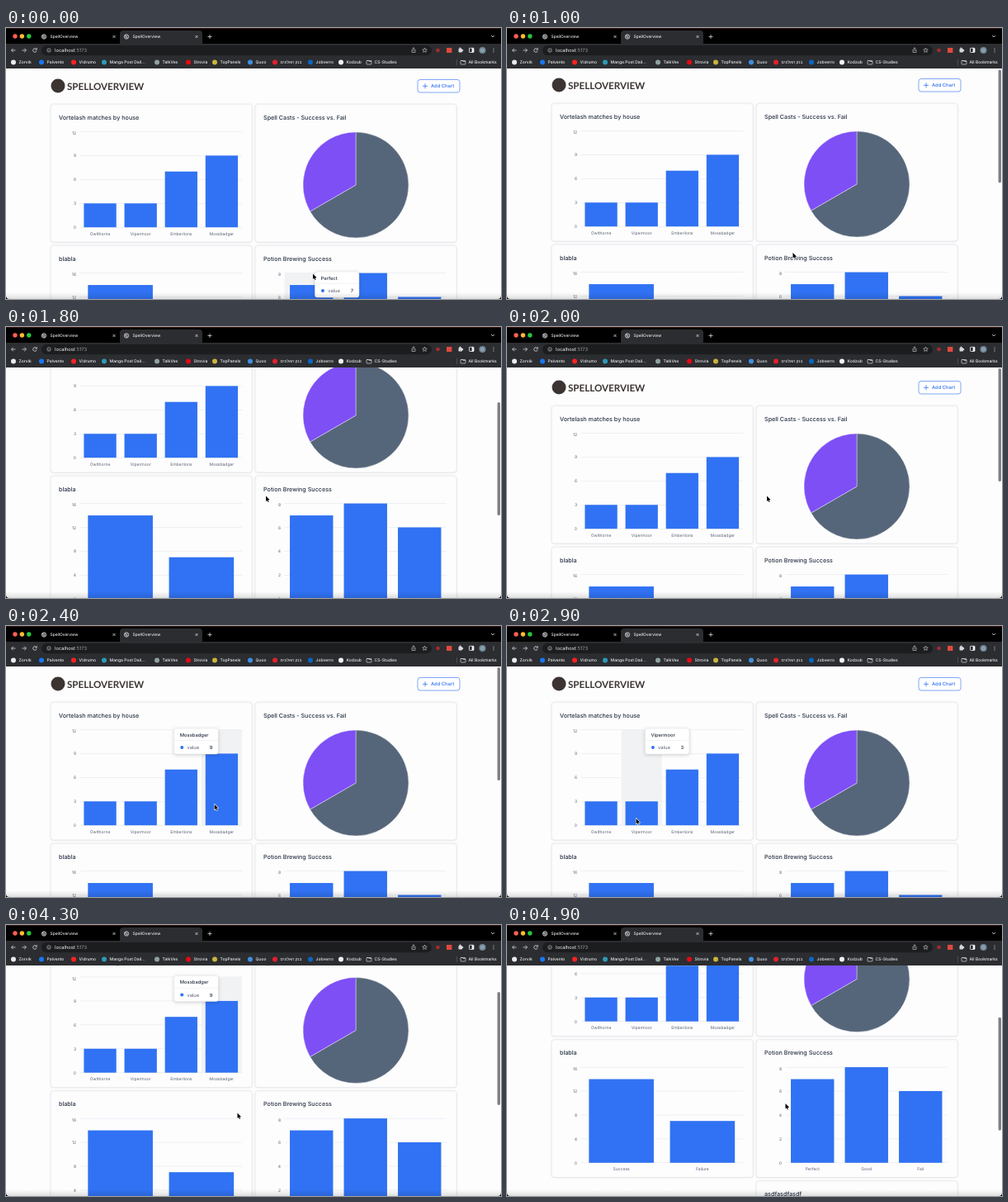
Write an HTML page with a canvas that moves like this. It is 600 px wide and 328 px high and loops after 5000 ms.

```html
<!DOCTYPE html>
<html lang="en">
<head>
<meta charset="utf-8">
<title>SpellOverview</title>
<style>
html, body { margin: 0; width: 100%; height: 100%; overflow: hidden; background: #000; }
canvas { display: block; width: 600px; height: 328px; }
</style>
</head>
<body>
<canvas id="stage"></canvas>
<script>
const W = 600, H = 328, LOOP = 5000, STEP = 100, TOP = 49;
const BLUE = '#3072f3', INK = '#273142', MUTED = '#596273', LINE = '#e5e7eb', PAGE = '#fdfdfe';
const BAR = '#2c2d30', ICON = '#d5d7da', LABEL = '#eceef0';
const FONT = 'Inter, "Liberation Sans", sans-serif';

const canvas = document.getElementById('stage');
const c = canvas.getContext('2d');
const dpr = window.devicePixelRatio || 1;
canvas.width = W * dpr;
canvas.height = H * dpr;
c.textRendering = 'geometricPrecision';

// Charts: plot left, plot top, axis maximum, labels, values
const PLOT_W = 196.5, PLOT_H = 115.7;
const charts = [
  { x: 89.5, y: 125.5, max: 12, names: ['Owlthorne', 'Vipermoor', 'Emberlions', 'Mossbadger'], vals: [3, 3, 7, 9] },
  { x: 89.5, y: 296.6, max: 16, names: ['Success', 'Failure'], vals: [14, 7] },
  { x: 337.5, y: 296.6, max: 8, names: ['Perfect', 'Good', 'Fail'], vals: [7, 8, 6] }
];

// Motion tracks: time, then values
const pointer = [
  [0, 372, 297.5], [500, 346.5, 272], [1100, 346.5, 272], [1600, 315, 204.5], [2100, 315, 204.5],
  [2800, 156.5, 233], [3000, 156.5, 233], [3700, 280.5, 227.5], [4300, 280.5, 227.5], [4900, 337.5, 216]
];
const scroll = [
  [0, 0], [800, 0], [1000, 1], [1400, 124], [1600, 124], [1800, 83], [2000, -3], [2300, 0],
  [3800, 0], [4300, 62.5], [4900, 124.5]
];
// Hover spans: start, end, chart, column
const hovers = [
  [0, 100, 2, 0], [2300, 2500, 0, 3], [2500, 2600, 0, 2], [2600, 3300, 0, 1],
  [3300, 3500, 0, 2], [3500, 4400, 0, 3]
];

function track(keys, t) {
  const i = keys.findIndex(k => k[0] > t);
  if (i < 0) return keys[keys.length - 1].slice(1);
  const a = keys[i - 1], b = keys[i];
  const u = (t - a[0]) / (b[0] - a[0]), e = u * u * (3 - 2 * u);
  return a.slice(1).map((v, n) => v + (b[n + 1] - v) * e);
}

function text(s, x, y, size, color, weight = 400, align = 'left', font = FONT) {
  c.font = `${weight} ${size}px ${font}`;
  c.fillStyle = color;
  c.textAlign = align;
  c.textBaseline = 'alphabetic';
  c.fillText(s, x, y + size * 0.36);
}
function rect(x, y, w, h, color) {
  c.fillStyle = color;
  c.fillRect(x, y, w, h);
}
function round(x, y, w, h, r, fill, stroke, lw = 0.6) {
  c.beginPath();
  c.roundRect(x, y, w, h, r);
  if (fill) { c.fillStyle = fill; c.fill(); }
  if (stroke) { c.strokeStyle = stroke; c.lineWidth = lw; c.stroke(); }
}
function dot(x, y, r, fill, stroke, lw = 0.7) {
  c.beginPath();
  c.arc(x, y, r, 0, 7);
  if (fill) { c.fillStyle = fill; c.fill(); }
  if (stroke) { c.strokeStyle = stroke; c.lineWidth = lw; c.stroke(); }
}
function path(pts, color, lw = 0.8, close) {
  c.beginPath();
  for (let i = 0; i < pts.length; i += 2) c.lineTo(pts[i], pts[i + 1]);
  if (close) c.closePath();
  c.strokeStyle = color;
  c.lineWidth = lw;
  c.stroke();
}
function plus(x, y, r, color) {
  path([x - r, y, x + r, y], color);
  path([x, y - r, x, y + r], color);
}
function cross(x, y, r) {
  path([x - r, y - r, x + r, y + r], ICON, 0.8);
  path([x - r, y + r, x + r, y - r], ICON, 0.8);
}
function globe(x, y) {
  dot(x, y, 2.7, '#55585d', ICON, 0.8);
  path([x - 2, y - 1, x, y - 0.3, x + 0.5, y + 1.5], ICON, 0.8);
}
function folder(x, y) {
  round(x - 3, y - 2, 6, 4.5, 0.7, null, ICON, 0.7);
  path([x - 3, y - 2, x - 0.5, y - 2, x, y - 1, x + 3, y - 1], ICON, 0.7);
}

function drawTabs() {
  rect(0, 0, W, 20, '#000');
  rect(0, 0, W, 1, '#3a1512');
  ['#fe5f57', '#febc2e', '#28c840'].forEach((k, i) => dot(11 + i * 8.4, 10, 2.7, k));
  round(138, 3, 100, 20, 4, BAR);
  for (const x of [46, 146]) {
    globe(x, 10.5);
    text('SpellOverview', x + 7.5, 10.5, 4.9, LABEL, 500);
    cross(x + 85, 10.5, 1.5);
  }
  plus(247, 10.5, 2.5, ICON);
  path([588, 9, 590, 11, 592, 9], ICON);
}

function drawToolbar() {
  rect(0, 19, W, 30, BAR);
  path([11.5, 27, 6.5, 27], ICON);
  path([8.8, 24.7, 6.5, 27, 8.8, 29.3], ICON);
  path([19.5, 27, 24.5, 27], ICON);
  path([22.2, 24.7, 24.5, 27, 22.2, 29.3], ICON);
  c.beginPath();
  c.arc(35, 27, 2.3, 0.3, 5.6);
  c.stroke();
  path([37.3, 24.2, 37.3, 26.2, 35.3, 26.2], ICON);

  round(43, 21, 473, 12.3, 6.1, '#1c1d1f');
  dot(52, 27, 2.2, null, ICON, 0.6);
  path([52, 26.7, 52, 28.2], ICON, 0.6);
  text('localhost', 59, 27, 5.8, '#f1f3f4');
  const w = c.measureText('localhost').width;
  text(':5173', 59 + w, 27, 5.8, '#9aa0a6');
  path([492.8, 26, 492, 26, 492, 29.5, 496, 29.5, 496, 26, 495.2, 26], ICON, 0.6);
  path([494, 28, 494, 23.8], ICON, 0.6);
  path([492.8, 25, 494, 23.8, 495.2, 25], ICON, 0.6);
  const star = [];
  for (let i = 0; i < 10; i++) {
    const a = i * Math.PI / 5 - Math.PI / 2, r = i % 2 ? 1.3 : 2.9;
    star.push(507.5 + r * Math.cos(a), 27 + r * Math.sin(a));
  }
  path(star, ICON, 0.6, true);

  dot(523.5, 27, 2.3, '#a92a32');
  rect(534, 24, 6.4, 6, '#e0483e');
  round(534 + 14.5, 25, 4.5, 4.5, 0.8, ICON);
  dot(550.5, 24.7, 1.1, ICON);
  dot(553.2, 27.2, 1.1, ICON);
  round(561.5, 24.3, 5.5, 5.2, 0.7, null, '#f1f3f4', 0.8);
  rect(564.7, 24.3, 2.3, 5.2, '#f1f3f4');
  dot(577.5, 27, 4, '#71899a');
  dot(577.5, 27, 1.5, null, '#c9d5dc', 0.6);
  for (const y of [25, 27, 29]) dot(591, y, 0.6, ICON);
}

function drawBookmarks() {
  const items = [
    [9, 'Zorvik', '#e8eaed'], [43, 'Palvento', '#1877f2'], [82, 'Vidrumo', '#f22'],
    [119, 'Manga Post Dail...', '#2c9ab8'], [183, 'TalkVex', '#8fa39d'], [221, 'Strovia', '#e50914'],
    [253, 'TopPanels', '#c9b53c'], [296, 'Quoo', '#3f8fe0'], [326, 'בנק האלונים', '#e3202c'],
    [369, 'Jobverro', '#0a66c2'], [406, 'Kodzub', '#f1f3f4']
  ];
  for (const [x, name, color] of items) {
    dot(x, 41.5, 3, color);
    text(name, x + 6.6, 41.5, 5, LABEL, 500);
  }
  folder(440, 41.5);
  text('CS-Studies', 446.5, 41.5, 5, LABEL, 500);
  rect(546, 38, 0.6, 7, '#5f6368');
  folder(554, 41.5);
  text('All Bookmarks', 560.5, 41.5, 5, LABEL, 500);
}

function card(x, y, title) {
  c.save();
  c.shadowColor = 'rgba(0,0,0,.08)';
  c.shadowBlur = 1.5 * dpr;
  c.shadowOffsetY = 0.5 * dpr;
  round(x, y, 244.3, 167, 3.5, PAGE, '#e3e6ea');
  c.restore();
  text(title, x + 10, y + 16, 7.2, INK, 500);
}

function drawChart(ch, active) {
  const col = PLOT_W / ch.vals.length, base = ch.y + PLOT_H;
  for (let i = 0; i <= 4; i++) {
    const y = base - PLOT_H * i / 4;
    rect(ch.x, y - 0.25, PLOT_W, 0.5, '#dfe2e7');
    text(ch.max * i / 4, ch.x - 4.5, y + (i === 4 ? 1.8 : 0.2), 5, MUTED, 400, 'right');
  }
  if (active >= 0) rect(ch.x + active * col, ch.y, col, PLOT_H, '#f1f2f4');
  ch.vals.forEach((v, i) => {
    const h = PLOT_H * v / ch.max;
    rect(ch.x + (i + 0.1) * col, base - h, col * 0.8, h, BLUE);
    text(ch.names[i], ch.x + (i + 0.5) * col, base + 7.8, 5, MUTED, 400, 'center');
  });
}

function drawPie(x, y, r) {
  const top = -Math.PI / 2, cut = top - Math.PI * 2 / 3;
  for (const [a, b, color] of [[top, cut + Math.PI * 2, '#56667a'], [cut, top, '#7d4ff5']]) {
    c.beginPath();
    c.moveTo(x, y);
    c.arc(x, y, r, a, b);
    c.closePath();
    c.fillStyle = color;
    c.fill();
    c.strokeStyle = '#fff';
    c.lineWidth = 0.4;
    c.stroke();
  }
}

const TIP_W = 53.5;
function tipX([, , k, i]) {
  const ch = charts[k], mid = ch.x + (i + 0.5) * PLOT_W / ch.vals.length;
  return mid + 4.2 + TIP_W > ch.x + PLOT_W ? mid - 4.2 - TIP_W : mid + 4.2;
}

function drawTip(n, t) {
  const hover = hovers[n], prev = hovers[n - 1], ch = charts[hover[2]], i = hover[3];
  let x = tipX(hover);
  if (prev && prev[1] === hover[0]) {
    const left = 1 - Math.min(1, (t - hover[0]) / 300);
    x += (tipX(prev) - x) * left * left;
  }
  const y = ch.y - 1.5;
  c.save();
  c.shadowColor = 'rgba(0,0,0,.2)';
  c.shadowBlur = 4 * dpr;
  c.shadowOffsetY = 1 * dpr;
  round(x, y, TIP_W, 31, 2.8, '#fff');
  c.restore();
  round(x, y, TIP_W, 31, 2.8, null, LINE, 0.5);
  text(ch.names[i], x + 7, y + 7.6, 5.8, INK, 500);
  rect(x, y + 14.4, TIP_W, 0.5, LINE);
  dot(x + 9.5, y + 23, 2, BLUE);
  text('value', x + 15.7, y + 23, 5.8, MUTED);
  text(ch.vals[i], x + 46.7, y + 23, 5.8, INK, 500, 'right');
}

function drawPage(t, s) {
  c.save();
  c.beginPath();
  c.rect(0, TOP, W, H - TOP);
  c.clip();
  rect(0, TOP, W, H - TOP, PAGE);
  c.translate(0, -s);

  dot(63, 70, 8.5, '#3c3431');
  text('SPELLOVERVIEW', 74, 71.2, 11.6, '#3c3431', 700, 'left', 'Lato, sans-serif');
  round(499, 62.5, 51, 15.5, 3, '#fff', '#4a82f4', 0.7);
  plus(508, 70.3, 3, BLUE);
  text('Add Chart', 515, 70.4, 5.8, BLUE, 500);

  card(54, 92, 'Vortelash matches by house');
  card(302, 92, 'Spell Casts - Success vs. Fail');
  card(54, 263, 'blabla');
  card(302, 263, 'Potion Brewing Success');
  card(302, 434, 'asdfasdfasdf');

  const n = hovers.findIndex(h => t >= h[0] && t < h[1]);
  charts.forEach((ch, k) => drawChart(ch, n >= 0 && hovers[n][2] === k ? hovers[n][3] : -1));
  drawPie(424, 190, 64);
  if (n >= 0) drawTip(n, t);
  c.restore();

  if ((t >= 800 && t < 2700) || t >= 3800) {
    round(595.6, 50 + Math.max(0, s) * 0.495, 3.4, 137, 1.7, '#7e7f82');
  }
}

// Soft shade along the bottom and the window's rounded corners
function drawEdges() {
  const g = c.createLinearGradient(0, 320, 0, H);
  g.addColorStop(0, 'rgba(0,0,0,0)');
  g.addColorStop(1, 'rgba(0,0,0,.12)');
  rect(0, 320, W, 8, g);
  c.beginPath();
  c.rect(0, 320, W, 8);
  c.roundRect(0, 320, W, 8, [0, 0, 4, 4]);
  c.fillStyle = '#000';
  c.fill('evenodd');
}

function drawPointer(x, y) {
  const pts = [0, 0, 0, 6.6, 1.5, 5.3, 2.5, 7.6, 3.5, 7.2, 2.6, 4.9, 4.6, 4.8];
  c.save();
  c.translate(x, y);
  c.lineJoin = 'round';
  path(pts, '#fff', 1.2, true);
  c.fillStyle = '#000';
  c.fill();
  c.restore();
}

function draw(now) {
  const t = Math.floor(now % LOOP / STEP) * STEP;
  c.setTransform(dpr, 0, 0, dpr, 0, 0);
  const [s] = track(scroll, t);
  drawPage(t, s);
  drawEdges();
  drawTabs();
  drawToolbar();
  drawBookmarks();
  drawPointer(...track(pointer, t));
}

const start = performance.now();
function tick() {
  draw(performance.now() - start);
  requestAnimationFrame(tick);
}
tick();
</script>
</body>
</html>
```
